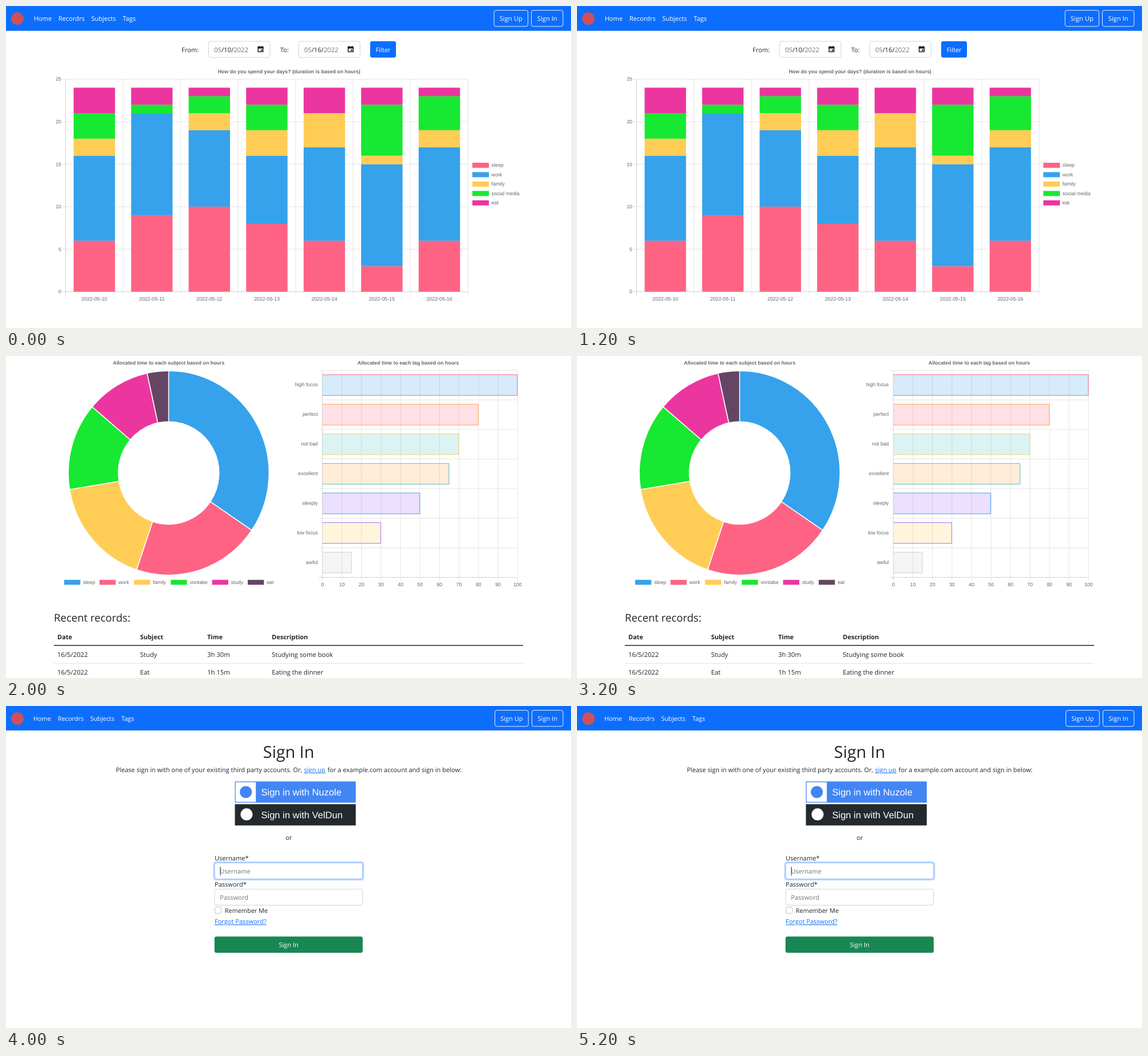
Recreate the animation shown at these times as an HTML page. Size 991 by 565 pixels, loop 6000 ms.

```html
<!DOCTYPE html>
<html lang="en">
<head>
<meta charset="utf-8">
<title>Time tracker tour</title>
<style>
html, body { margin: 0; width: 100%; height: 100%; overflow: hidden; background: #fff; }
svg { display: block; width: 991px; height: 565px; }
text { font-family: "Open Sans", "Noto Sans", sans-serif; fill: #212529; text-rendering: geometricPrecision; white-space: pre; }
.chart text { font-family: "Liberation Sans", Arial, sans-serif; fill: #666; font-size: 8.85px; }
.brand text { font-family: "Liberation Sans", Arial, sans-serif; fill: #fff; font-size: 16.6px; }
</style>
</head>
<body>
<svg id="stage" viewBox="0 0 991 565"></svg>
<script>
const BLUE = '#0d6efd', MUTED = '#6c757d', LINE = '#ced4da', GRID = '#e5e5e5', AXIS = '#d0d0d0';
const C = { sky: '#36a2eb', rose: '#ff6384', gold: '#ffcd56', green: '#17e831', pink: '#ec369f', plum: '#644664' };

const rect = (x, y, w, h, fill, more = '') =>
  `<rect x="${x}" y="${y}" width="${w}" height="${h}" fill="${fill}" ${more}/>`;
const box = (x, y, w, h, stroke, fill = '#fff', r = 3.5) =>
  rect(x, y, w, h, fill, `rx="${r}" stroke="${stroke}"`);
const line = (x1, y1, x2, y2, stroke = GRID, w = 1) =>
  `<path d="M${x1} ${y1}L${x2} ${y2}" stroke="${stroke}" stroke-width="${w}"/>`;
const dot = (x, y, r, fill) => `<circle cx="${x}" cy="${y}" r="${r}" fill="${fill}"/>`;
const text = (x, y, s, size = 11.05, fill = '', more = '') =>
  `<text x="${x}" y="${y}" style="font-size:${size}px${fill && ';fill:' + fill}" ${more}>${s}</text>`;
const label = (x, y, s, anchor = 'start', bold = false) =>
  `<text x="${x}" y="${y}" text-anchor="${anchor}"${bold ? ' font-weight="700"' : ''}>${s}</text>`;
const MID = 'text-anchor="middle"';

function navbar(h, xs, base, size, up, upW, inn, innW) {
  const links = ['Home', 'Recordrs', 'Subjects', 'Tags'];
  return rect(0, 0, 991, h, BLUE) + dot(20, 22, 11, '#d0505a') +
    links.map((s, i) => text(xs[i], base, s, size, '#fff')).join('') +
    [[up, upW, 'Sign Up'], [inn, innW, 'Sign In']].map(([x, w, s]) =>
      box(x, 7.5, w, 28.3, '#e4efff', 'none') + text(x + w / 2, base, s, size + .15, '#fff', MID)).join('');
}

function dateField(x, day) {
  const ic = x + 86;
  return box(x, 62, 107.5, 28.3, LINE) +
    text(x + 9.5, 80.6, `05<tspan fill="#212529" style="fill:#212529">/${day}/</tspan>2022`, 11.3, MUTED) +
    `<path d="M${ic + .7} 72.2h8.6v8.2h-8.6z" fill="none" stroke="#000" stroke-width="1.3"/>` +
    rect(ic, 71.5, 10, 3, '#000') + rect(ic + 1.6, 70.2, 1.4, 2, '#000') +
    rect(ic + 7, 70.2, 1.4, 2, '#000') + rect(ic + 5.4, 76.4, 2.4, 2.4, '#000');
}

function stackedBars() {
  const x0 = 104.5, x1 = 810.5, y0 = 501.3, unit = 14.916, step = (x1 - x0) / 7;
  const names = ['sleep', 'work', 'family', 'social media', 'eat'];
  const colors = [C.rose, C.sky, C.gold, C.green, C.pink];
  const days = [[6, 10, 2, 3, 3], [9, 12, 0, 1, 2], [10, 9, 2, 2, 1], [8, 8, 3, 3, 2],
    [6, 11, 4, 0, 3], [3, 12, 1, 6, 2], [6, 11, 2, 4, 1]];
  let s = label(496.5, 118.2, 'How do you spend your days? (duration is based on hours)', 'middle', true);
  for (let v = 0; v <= 25; v += 5) {
    const y = y0 - v * unit;
    s += line(98.5, y, x1, y, v ? GRID : AXIS) + label(97, y + 3, v, 'end');
  }
  for (let i = 0; i <= 7; i++) {
    const x = x0 + i * step;
    s += line(x, 128.4, x, 507, i ? GRID : AXIS);
  }
  days.forEach((parts, i) => {
    const mid = x0 + (i + .5) * step, w = step * .72;
    let y = y0;
    parts.forEach((v, k) => {
      y -= v * unit;
      if (v) s += rect(mid - w / 2, y, w, v * unit, colors[k]);
    });
    s += label(mid, 517.4, '2022-05-' + (10 + i), 'middle');
  });
  names.forEach((n, i) => {
    const y = 279.4 + i * 16.5;
    s += rect(818, y - 4.4, 29, 8.9, colors[i]) + label(851.6, y + 2.6, n);
  });
  return `<g class="chart">${s}</g>`;
}

function doughnut() {
  const parts = [10, 6, 5, 4, 3, 1], total = 29;
  const names = ['sleep', 'work', 'family', 'vontabe', 'study', 'eat'];
  const colors = [C.sky, C.rose, C.gold, C.green, C.pink, C.plum];
  const keys = [102, 164, 224.5, 289, 361.5, 424];
  const at = (turn, k) => {
    const a = turn * 2 * Math.PI;
    return `${(285.3 + 176 * k * Math.sin(a)).toFixed(2)} ${(205.2 - 179.2 * k * Math.cos(a)).toFixed(2)}`;
  };
  let s = label(285.3, 15, 'Allocated time to each subject based on hours', 'middle', true), sum = 0;
  parts.forEach((v, i) => {
    const a = sum / total, b = (sum += v) / total;
    s += `<path d="M${at(a, 1)}A176 179.2 0 0 1 ${at(b, 1)}L${at(b, .502)}A88.35 89.96 0 0 0 ${at(a, .502)}Z" fill="${colors[i]}" stroke="#fff" stroke-width="1.5"/>`;
    s += rect(keys[i], 392.8, 28.4, 8.6, colors[i]) + label(keys[i] + 33.2, 399.8, names[i]);
  });
  return `<g class="chart">${s}</g>`;
}

function tagBars() {
  const x0 = 555, unit = 3.423, top = 25.1, step = 51.9, end = top + 7 * step;
  const rows = [['high focus', 100, '54,162,235', '255,99,132'], ['perfect', 80, '255,99,132', '255,159,64'],
    ['not bad', 70, '75,192,192', '255,205,86'], ['excellent', 65, '255,159,64', '75,192,192'],
    ['sleeply', 50, '153,102,255', '54,162,235'], ['low focus', 30, '255,205,86', '153,102,255'],
    ['awful', 15, '201,203,207', '201,203,207']];
  let s = label(705.5, 15, 'Allocated time to each tag based on hours', 'middle', true);
  for (let v = 0; v <= 100; v += 10) {
    const x = x0 + v * unit;
    s += line(x, top, x, end + 5.5, v ? GRID : AXIS) + label(x, 404.2, v, 'middle');
  }
  for (let i = 0; i <= 7; i++) s += line(549, top + i * step, 897.3, top + i * step, i < 7 ? GRID : AXIS);
  rows.forEach(([name, v, fill, edge], i) => {
    const mid = top + (i + .5) * step, h = step * .72, r = x0 + v * unit;
    s += rect(x0, mid - h / 2, v * unit, h, `rgba(${fill},.2)`) +
      `<path d="M${x0} ${mid - h / 2 + .5}H${r - .5}V${mid + h / 2 - .5}H${x0}" fill="none" stroke="rgb(${edge})" stroke-width=".9"/>` +
      label(547, mid + 2.2, name, 'end');
  });
  return `<g class="chart">${s}</g>`;
}

function records() {
  const cols = [90, 235.3, 353, 466.3];
  const row = (cells, y, size, more) => cells.map((c, i) => text(cols[i], y, c, size, '', more)).join('');
  return text(84, 466, 'Recent records:', 18.6, '', 'font-weight="500"') +
    row(['Date', 'Subject', 'Time', 'Description'], 496.6, 11, 'font-weight="700"') +
    line(84, 507.8, 907, 507.8, '#212529', 1.5) +
    row(['16/5/2022', 'Study', '3h 30m', 'Studying some book'], 528, 11.3) +
    line(84, 539.3, 907, 539.3, '#dee2e6') +
    row(['16/5/2022', 'Eat', '1h 15m', 'Eating the dinner'], 559, 11.3);
}

function signIn() {
  const under = 'text-decoration="underline"';
  return text(495.7, 90.5, 'Sign In', 28.8, '', MID + ' font-weight="500"') +
    text(192.8, 116, 'Please sign in with one of your existing third party accounts. Or,') +
    text(522.8, 116, 'sign up', 11.05, BLUE, under) +
    text(564, 116, 'for a example.com account and sign in below:') +
    '<g class="brand">' +
    rect(401.5, 132.4, 212, 37.2, '#4285f4') + rect(402.8, 133.7, 35.4, 34.6, '#fff') +
    dot(420.7, 151, 10.6, '#4285f4') + '<text x="447.4" y="157">Sign in with Nuzole</text>' +
    rect(401.5, 172.3, 212, 37.3, '#24292e') + dot(422, 190.2, 10.6, '#fff') +
    '<text x="447.4" y="197">Sign in with VelDun</text></g>' +
    text(496, 235, 'or', 11.05, '', MID) +
    text(366, 270.6, 'Username*') +
    rect(363.2, 272.4, 265.1, 33.9, '#c2dbfe', 'rx="5.5"') +
    box(366, 275.2, 259.5, 28.3, '#86b7fe') +
    text(375.3, 293.6, 'Username', 11.05, MUTED) + line(376, 282, 376, 297.5, '#212529') +
    text(366, 317, 'Password*') +
    box(366, 321.3, 259.5, 28.2, LINE) + text(375.3, 339.7, 'Password', 11.05, MUTED) +
    box(366.4, 352.8, 11.2, 11.2, '#bfbfbf', '#fff', 2.5) +
    text(383.6, 363, 'Remember Me', 10.95) +
    text(366, 382.3, 'Forgot Password?', 11.05, BLUE, under) +
    rect(365.7, 404.4, 260, 28.5, '#198754', 'rx="3.5"') +
    text(495.7, 423, 'Sign In', 11.05, '#fff', MID);
}

const scenes = [
  navbar(43.6, [48.7, 92, 149.5, 204.8], 26.4, 11.1, 856, 59.5, 921.5, 55.5) +
    text(308, 80.6, 'From:') + dateField(355.5, 10) + text(481, 80.6, 'To:') + dateField(513.5, 16) +
    rect(638.7, 61.7, 45.3, 28.8, BLUE, 'rx="3.5"') + text(661.4, 80.6, 'Filter', 11.1, '#fff', MID) +
    stackedBars(),
  doughnut() + tagBars() + records(),
  navbar(42.9, [48, 91, 147.7, 202.3], 26, 10.9, 857.5, 58.7, 922.5, 54.5) + signIn()
];

const HOLD = 2000;
const stage = document.getElementById('stage');
stage.innerHTML = rect(0, 0, 991, 565, '#fff') + scenes.map(s => `<g class="scene">${s}</g>`).join('');
const groups = [...stage.querySelectorAll('.scene')];

function draw(t) {
  const now = Math.floor(t / HOLD) % groups.length;
  groups.forEach((g, i) => { g.style.display = i === now ? '' : 'none'; });
}

const start = performance.now();
function tick() {
  draw(performance.now() - start);
  requestAnimationFrame(tick);
}
tick();
</script>
</body>
</html>
```
